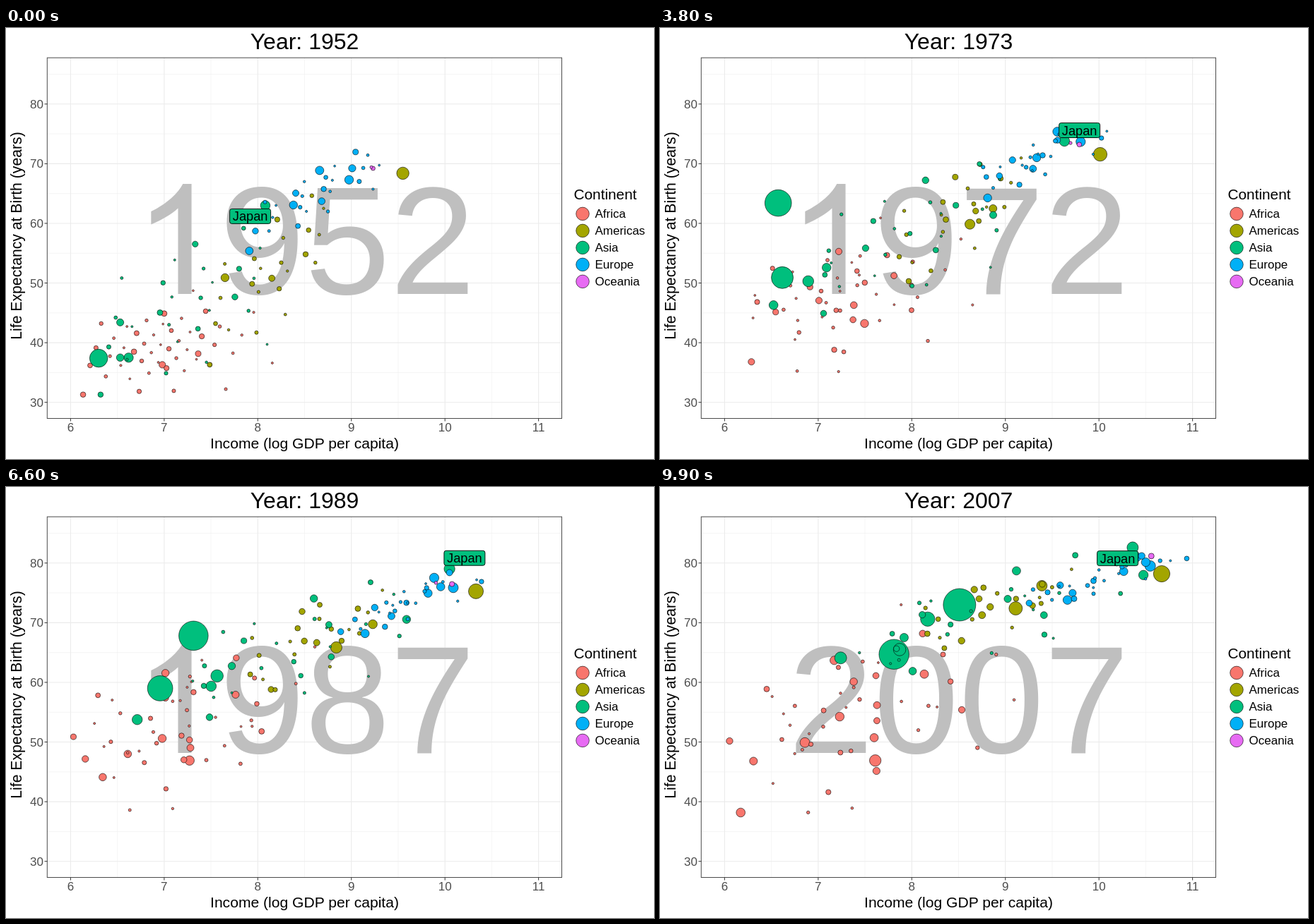
An HTML page for the animation above (10 s loop, 917 by 611 pixels).

```html
<!DOCTYPE html>
<html lang="en">
<head>
<meta charset="utf-8">
<title>Income and life expectancy</title>
<style>
html, body { margin: 0; width: 100%; height: 100%; overflow: hidden; background: #fff; }
svg { display: block; width: 917px; height: 611px; font-family: "Liberation Sans", Arial, sans-serif; }
.dot { stroke: #000; stroke-width: .6; }
</style>
</head>
<body>
<svg id="stage" viewBox="0 0 917 611"></svg>
<script>
const STEPS = 11, FRAMES = 100, FRAME_MS = 100;
const COLORS = { Africa: '#F8766D', Americas: '#A3A500', Asia: '#00BF7D', Europe: '#00B0F6', Oceania: '#E76BF3' };
const stage = document.getElementById('stage');
const px = v => 91.4 + (v - 6) * 132.45;
const py = v => 530.7 - (v - 30) * 8.458;
const radius = pop => 1.2 + .6 * Math.sqrt(pop);
const mix = (a, b, u) => a + (b - a) * u;

function el(tag, attrs, text) {
  const node = document.createElementNS('http://www.w3.org/2000/svg', tag);
  for (const k in attrs) node.setAttribute(k, attrs[k]);
  if (text) node.textContent = text;
  stage.appendChild(node);
  return node;
}
const line = (x1, y1, x2, y2, stroke, w) => el('line', { x1, y1, x2, y2, stroke, 'stroke-width': w });
const label = (text, x, y, size, anchor = 'start', fill = '#000') =>
  el('text', { x, y, 'font-size': size, 'text-anchor': anchor, fill }, text);

// --- data: every country is a function of the five-year step ---
const world = {};
for (const name in COLORS) world[name] = [];
let seed = 7;
const rand = () => (seed = (seed * 16807) % 2147483647) / 2147483647;

// Large countries run through a few key points [step, log income, life expectancy].
function giant(place, [p0, p1, ease], keys, name) {
  world[place].push(k => {
    const i = Math.max(1, keys.findIndex(key => key[0] >= k));
    const [a, b] = [keys[i - 1], keys[i]];
    const u = (k - a[0]) / (b[0] - a[0]);
    return { x: mix(a[1], b[1], u), y: mix(a[2], b[2], u), pop: p0 * (p1 / p0) ** ((k / STEPS) ** ease), name };
  });
}

// Bell-shaped value from an even one; evenly scattered values by a fixed stride.
const bell = p => { const q = .02 + .96 * p; return .55 * Math.log(q / (1 - q)); };
const scatter = (i, from, stride) => bell((from + i * stride) % 1);
const course = ([from, to, arch = 0, wave = 0], t) =>
  mix(from, to, t) + arch * Math.sin(Math.PI * t) + wave * Math.sin(2 * Math.PI * t);

// Smaller countries scatter around the common course of their continent.
function crowd(place, count, c) {
  for (let i = 0; i < count; i++) {
    const wealth = scatter(i, .8, .7549), health = scatter(i, .35, .5698), luck = bell(rand());
    const p0 = c.pop[0] * (c.pop[1] / c.pop[0]) ** ((i / (count - 1)) ** 1.3);
    const growth = c.growth * mix(.78, 1.22, rand());
    world[place].push(k => {
      const t = k / STEPS;
      const w = wealth * mix(1, .85, t) + luck * .53 * t;
      const link = course(c.link, t);
      const h = link * w + Math.sqrt(1 - link * link) * health;
      return {
        x: course(c.x, t) + course(c.xSpread, t) * w,
        y: Math.min(course(c.y, t) + course(c.ySpread, t) * h, mix(72.6, 82.2, t)),
        pop: p0 * growth ** t
      };
    });
  }
}

giant('Africa', [33, 135, 1], [[0, 6.98, 36.3], [5, 7.59, 44.5], [7, 7.24, 46.9], [11, 7.61, 46.9]]);
crowd('Africa', 51, {
  x: [6.93, 7.3, .03, .17], xSpread: [.6, .85], y: [39, 54.8, 3.5, -.8], ySpread: [4.8, 9],
  link: [.2, .5], pop: [22, .06], growth: 3.5
});

giant('Americas', [157, 301, 1], [[0, 9.55, 68.4], [4, 9.99, 71.3], [7, 10.3, 75], [11, 10.67, 78.2]]);
giant('Americas', [57, 190, .9], [[0, 7.65, 50.9], [5, 8.8, 61.5], [8, 8.85, 67.1], [11, 9.11, 72.4]]);
giant('Americas', [30, 109, .9], [[0, 8.15, 50.8], [6, 9.17, 67.4], [11, 9.39, 76.2]]);
crowd('Americas', 22, {
  x: [8.15, 8.95, .03, .08], xSpread: [.5, .5], y: [52.5, 73.3, 2], ySpread: [8.5, 4],
  link: [.7, .65], pop: [18, .66], growth: 2.5
});

giant('Asia', [556, 1318, .7],
  [[0, 5.99, 44], [1, 6.36, 50.5], [2, 6.19, 44.5], [4, 6.52, 63.1], [7, 7.23, 67.3], [9, 7.73, 70.4], [11, 8.51, 73]]);
giant('Asia', [372, 1110, 1], [[0, 6.3, 37.4], [6, 6.75, 56.6], [8, 7.06, 60.2], [11, 7.81, 64.7]]);
giant('Asia', [86.5, 127.5, .7], [[0, 8.08, 63], [4, 9.6, 73.4], [7, 10.02, 78.7], [11, 10.36, 82.6]], 'Japan');
giant('Asia', [82, 223.5, 1], [[0, 6.62, 37.5], [3, 6.64, 46], [7, 7.47, 60.1], [9, 8.04, 66], [11, 8.17, 70.6]]);
giant('Asia', [46.9, 148, 1], [[0, 6.53, 37.5], [6, 6.52, 50], [11, 7.24, 64.1]]);
giant('Asia', [41.3, 161.6, 1], [[0, 6.53, 43.4], [8, 7.59, 60.8], [11, 7.87, 65.5]]);
crowd('Asia', 27, {
  x: [7.25, 8.65, .15, .03], xSpread: [.7, 1.1], y: [47, 71, 2.7, -.5], ySpread: [8.5, 6.8],
  link: [.5, .75], pop: [26, .12], growth: 2.7
});

crowd('Europe', 30, {
  x: [8.6, 10.05, .17, .1], xSpread: [.52, .48], y: [65, 77.6, 1.1, .8], ySpread: [5.2, 2.7],
  link: [.85, .85], pop: [69, .15], growth: 1.35
});
crowd('Oceania', 2, {
  x: [9.21, 10.2, .05, .06], xSpread: [.03, .25], y: [69.2, 80.6, -.6, .1], ySpread: [.2, .6],
  link: [.5, .8], pop: [8.7, 2], growth: 2.2
});

// --- fixed parts ---
for (let v = 6.5; v < 11; v++) line(px(v), 42, px(v), 553.5, '#f1f1f1', .7);
for (let v = 35; v < 90; v += 10) line(58, py(v), 787, py(v), '#f1f1f1', .7);
for (let v = 6; v < 12; v++) line(px(v), 42, px(v), 553.5, '#ebebeb', 1.1);
for (let v = 30; v < 90; v += 10) line(58, py(v), 787, py(v), '#ebebeb', 1.1);

// Large year behind the dots; its leading 1 is a plain stroke without a foot.
const BACK = '#bfbfbf', BACK_SIZE = 217, BACK_LEFT = 423 - BACK_SIZE * 1.112;
const backYear = label('', BACK_LEFT + BACK_SIZE * 2.224, 377, BACK_SIZE, 'end', BACK);
const backOne = el('path', {
  d: 'M763 0H583V1147Q518 1085 412 1023T223 930V1104Q374 1175 487 1276T647 1472H763Z',
  transform: `translate(${BACK_LEFT} 377) scale(${BACK_SIZE / 2048} ${-BACK_SIZE / 2048})`, fill: BACK
});

// One dot for each population rank within a continent.
const dots = [];
for (const place in world) {
  const states = Array.from({ length: STEPS + 1 }, (_, k) =>
    world[place].map(at => at(k)).sort((a, b) => b.pop - a.pop));
  world[place].forEach((_, rank) => dots.push({
    node: el('circle', { class: 'dot', fill: COLORS[place] }),
    path: states.map(s => s[rank])
  }));
}

const tagBox = el('rect', { width: 58, height: 21, rx: 3, fill: COLORS.Asia, stroke: '#000', 'stroke-width': .9 });
const tagText = label('Japan', 0, 0, 18.2, 'middle');

el('rect', { x: 58.3, y: 42.2, width: 728.2, height: 511.3, fill: 'none', stroke: '#4a4a4a', 'stroke-width': 1 });
for (let v = 6; v < 12; v++) {
  line(px(v), 553.5, px(v), 557.5, '#333', 1);
  label(String(v), px(v), 572, 17, 'middle', '#4d4d4d');
}
for (let v = 30; v < 90; v += 10) {
  line(54.5, py(v), 58.5, py(v), '#333', 1);
  label(String(v), 53, py(v) + 6, 17, 'end', '#4d4d4d');
}
label('Income (log GDP per capita)', 422.5, 596, 21.1, 'middle');
label('Life Expectancy at Birth (years)', 0, 0, 21.2, 'middle').setAttribute('transform', 'translate(22 294.5) rotate(-90)');
const title = label('Year: 1952', 422.5, 29.5, 32, 'middle');

label('Continent', 803.5, 243, 20.8);
Object.keys(COLORS).forEach((name, i) => {
  const y = 263.4 + 24 * i;
  el('circle', { class: 'dot', cx: 816, cy: y, r: 9.3, fill: COLORS[name] });
  label(name, 833.5, y + 6, 17);
});

// --- motion ---
function draw(frame) {
  const step = frame / 9;
  const k = Math.min(STEPS - 1, Math.floor(step)), u = step - k;
  title.textContent = 'Year: ' + Math.round(1952 + step * 5);
  const back = String(1952 + 5 * Math.round(step));
  backYear.textContent = back.replace(/^1/, '');
  backOne.setAttribute('visibility', back[0] === '1' ? 'visible' : 'hidden');
  for (const { node, path } of dots) {
    const a = path[k], b = path[k + 1];
    const x = mix(a.x, b.x, u), y = mix(a.y, b.y, u);
    const shown = x >= 6 && x <= 11 && y >= 30 && y <= 85;
    node.setAttribute('visibility', shown ? 'visible' : 'hidden');
    node.setAttribute('cx', px(x));
    node.setAttribute('cy', py(y));
    node.setAttribute('r', radius(mix(a.pop, b.pop, u)));
    if ((u < .5 ? a : b).name) placeTag(px(x), py(y), frame);
  }
}

// The tag sits lower left of its dot, at times upper right.
function placeTag(x, y, frame) {
  const side = frame % 28 > 6 && frame % 28 < 14 ? 1 : -1;
  const cx = x + 21.3 * side, cy = y - 15.3 * side;
  tagBox.setAttribute('x', cx - 29);
  tagBox.setAttribute('y', cy - 10.5);
  tagText.setAttribute('x', cx);
  tagText.setAttribute('y', cy + 6.5);
}

const start = performance.now();
let last = -1;
function tick() {
  const frame = Math.floor((performance.now() - start) / FRAME_MS) % FRAMES;
  if (frame !== last) draw(last = frame);
  requestAnimationFrame(tick);
}
tick();
</script>
</body>
</html>
```
